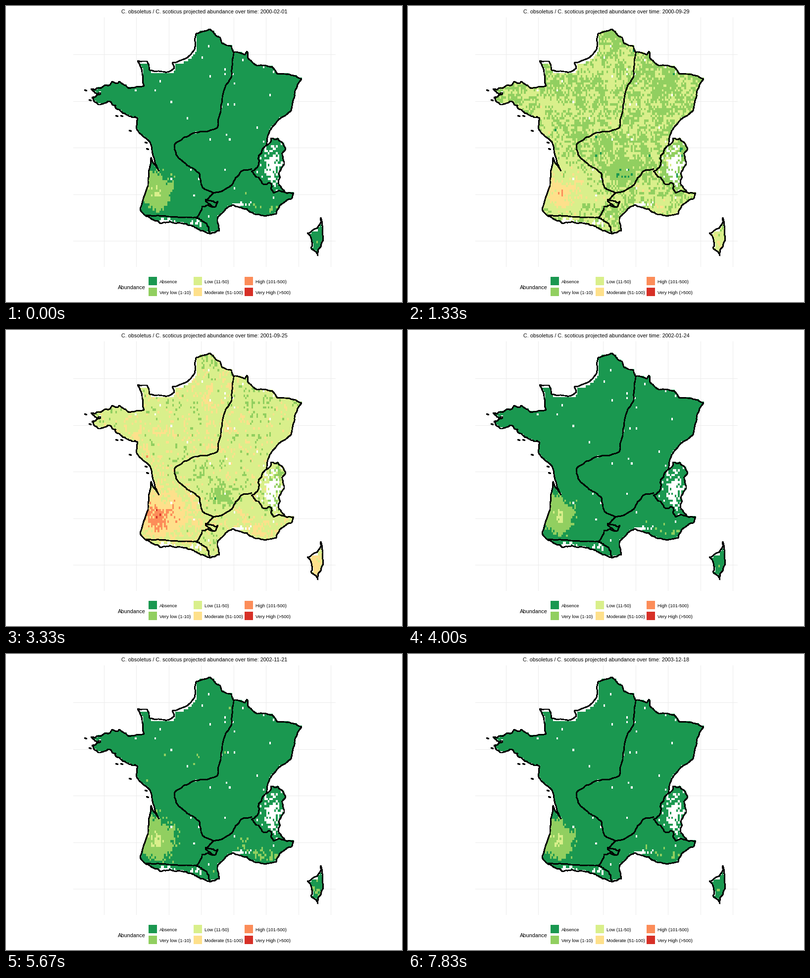
A matplotlib script that plays this animation: 800 by 600 pixels, repeating every 8000 ms.

```python
import numpy as np
import matplotlib.pyplot as plt
from matplotlib.animation import FuncAnimation
from matplotlib.colors import to_rgba_array
from matplotlib.path import Path
from matplotlib.patches import Rectangle

W, H, DPI = 800, 600, 100
LOOP_MS, TICK_MS, STEPS = 8000, 40, 48
COLORS = ["#1A9850", "#91CF60", "#D9EF8B", "#FEE08B", "#FC8D59", "#D73027"]
LABELS = ["Absence", "Very low (1-10)", "Low (11-50)",
          "Moderate (51-100)", "High (101-500)", "Very High (>500)"]

plt.rcParams["font.family"] = "Liberation Sans"
rng = np.random.default_rng(7)


def px(v):
    return v * 72 / DPI


def lon_x(lon):
    return 198.5 + 32.71 * (lon + 4)


def lat_y(lat):
    return 98.5 + 47.25 * (50 - lat)


def ragged(rough, pts):
    """Roughen a line through key points by midpoint displacement."""
    pts = np.array(pts, float)
    while True:
        step = np.diff(pts, axis=0)
        size = np.hypot(*step.T)
        if size.max() < 5:
            return pts
        normal = np.column_stack([-step[:, 1], step[:, 0]])
        shift = rough * np.clip(rng.normal(size=len(step)), -1.3, 1.3)
        mid = pts[:-1] + step / 2 + normal * shift[:, None]
        keep = size >= 5
        pts = np.insert(pts, np.flatnonzero(keep) + 1, mid[keep], axis=0)


# Outer border, anticlockwise from the northern tip
CHANNEL = ragged(.06, [(412, 47), (384, 56), (381, 88), (370, 101), (336, 115),
                       (340, 126), (327, 134), (290, 130), (285, 112), (266, 111),
                       (275, 134), (279, 162), (248, 167), (229, 153)])
BRITTANY = ragged(.2, [(229, 153), (202, 160), (172, 168), (191, 176), (174, 186),
                       (190, 200), (229, 210), (266, 227)])
ATLANTIC = ragged(.04, [(266, 227), (264, 250), (291, 276), (297, 303), (309, 334),
                        (293, 307), (287, 365), (271, 412)])
PYRENEES = ragged(.12, [(271, 412), (283, 426), (312, 441), (353, 440), (394, 456),
                        (431, 456)])
RIVIERA = ragged(.08, [(431, 456), (428, 428), (459, 403), (486, 411), (520, 425),
                       (546, 422), (548, 413), (577, 391), (581, 379)])
ALPS_OUTER = ragged(.15, [(581, 379), (564, 378), (551, 362), (555, 333), (562, 317),
                          (549, 268), (535, 268), (526, 283)])
EAST = ragged(.05, [(526, 283), (529, 263), (556, 226), (576, 212), (584, 172),
                    (597, 148)])
NORTH = ragged(.08, [(597, 148), (549, 138), (537, 123), (507, 121), (488, 104),
                     (487, 92), (482, 99), (460, 94), (456, 82), (436, 75),
                     (433, 64), (412, 47)])
MAINLAND = np.vstack([CHANNEL, BRITTANY, ATLANTIC, PYRENEES, RIVIERA, ALPS_OUTER,
                      EAST, NORTH])
CORSICA = ragged(.12, [(636, 429), (633, 444), (609, 460), (616, 490), (630, 506),
                       (640, 465), (636, 429)])

# Inner zone limits
CENTRE = ragged(.06, [(460, 94), (456, 143), (437, 185), (434, 213), (427, 247),
                      (380, 257), (341, 280), (344, 302), (391, 340), (397, 368),
                      (419, 379), (456, 363), (475, 335), (496, 330)])
ALPS_INNER = ragged(.15, [(526, 283), (511, 320), (496, 335), (514, 353), (536, 361),
                          (541, 379), (564, 378)])
SOUTH = ragged(.1, [(419, 379), (403, 395), (421, 408), (396, 406), (384, 429)])
FOOTHILLS = ragged(.05, [(384, 429), (340, 427), (283, 424)])
LOOP = ragged(.15, [(403, 392), (428, 396), (421, 408)])
CATALAN = ragged(.15, [(384, 429), (404, 440), (412, 460)])
ISLES = [(161, 171), (170, 191), (224, 223), (234, 223), (251, 253), (283, 277),
         (286, 290)]

# Regions: x, y, rx, ry, then winter rise, spring factor, autumn factor
REGIONS = {
    "Landes": (303, 375, 30, 43, 1.6, 0, .55),
    "Gascony": (350, 370, 50, 50, .15, .03, .25),
    "Brittany": (212, 172, 38, 16, .25, -.45, -.08),
    "Normandy": (330, 148, 60, 28, 0, -.17, 0),
    "Flanders": (410, 60, 28, 16, 0, -.4, -.2),
    "Lorraine": (510, 140, 32, 28, 0, -.1, -.15),
    "Vendee": (275, 245, 25, 40, .25, -.22, .1),
    "Berry": (390, 215, 40, 22, .3, 0, .05),
    "Limousin": (385, 288, 35, 25, 0, -.03, -.2),
    "Massif": (430, 338, 30, 28, 0, -.08, -.42),
    "Alps": (543, 325, 16, 52, 0, -.5, -.4),
    "Languedoc": (480, 390, 35, 18, .5, -.17, .15),
    "Roussillon": (422, 438, 14, 18, .5, -.25, .05),
    "Provence": (535, 410, 28, 14, .7, -.05, .2),
    "Corsica": (625, 475, 18, 30, .55, -.05, .35),
}

# Cells of 0.1 degree
LON0, LAT0, COLS, ROWS = -5.2, 51.2, 150, 100
X, Y = np.meshgrid(lon_x(LON0 + .1 * (np.arange(COLS) + .5)),
                   lat_y(LAT0 - .1 * (np.arange(ROWS) + .5)))


def bump(x, y, rx, ry):
    return np.exp(-((X - x) / rx) ** 2 - ((Y - y) / ry) ** 2)


def inside(poly, dx=0, dy=0):
    pts = np.column_stack([(X + dx).ravel(), (Y + dy).ravel()])
    return Path(poly).contains_points(pts).reshape(X.shape)


def land_mask():
    channel = (Y < 136) & (X > 262) & (X < 385)
    land = inside(MAINLAND) & (~channel | inside(MAINLAND, -4, -5))
    land |= inside(CORSICA) & inside(CORSICA, 0, -5)
    alps = inside(np.vstack([ALPS_OUTER, ALPS_INNER]))
    gaps = .006 + alps * (.1 + .9 * bump(539, 322, 12, 28))
    gaps += .9 * bump(320, 436, 17, 5) + .6 * bump(383, 440, 12, 6)
    gaps += .8 * bump(470, 404, 16, 5)
    return land & (rng.random(X.shape) > gaps)


def smooth(a, times=3):
    near = (-1, 0, 1)
    for _ in range(times):
        a = sum(np.roll(a, (i, j), (0, 1)) for i in near for j in near)
    return a / a.std()


LAND = land_mask()
ROUGH = .26 * rng.normal(size=X.shape) + .18 * smooth(rng.normal(size=X.shape))
WINTER, SPRING, AUTUMN = (
    sum(r[4 + k] * bump(*r[:4]) for r in REGIONS.values()) for k in range(3))
PALETTE = to_rgba_array(COLORS)


def sigmoid(v):
    return 1 / (1 + np.exp(-v))


def date(n):
    return np.datetime64("2000-02-01") + int(round(30.12 * n))


def cells(n):
    """Colours of all cells: a yearly wave, shaped by region, plus grain."""
    year = date(n).astype("datetime64[Y]")
    day = (date(n) - year.astype("datetime64[D]")).astype(int)
    age = year.astype(int) - 30
    active = sigmoid((day - 105) / 10) * sigmoid((300 - day) / 10)
    decline = .015 / (1 + .25 * age) * max(day - 140, 0)
    mean = .3 + active * (3.8 + .1 * age - decline)
    late = np.clip((day - 145) / 115, 0, 1)

    level = mean * (1 + active * ((1 - late) * SPRING + late * AUTUMN))
    level += (1 - active) * WINTER
    fresh = np.random.default_rng(100 + n).normal(size=X.shape)
    level += (.4 + active * (.35 + .25 * late)) * (ROUGH + .14 * fresh)
    rgba = PALETTE[np.clip(np.floor(level), 0, 5).astype(int)]
    rgba[~LAND, 3] = 0
    return rgba


def title(n):
    return f"C. obsoletus / C. scoticus projected abundance over time: {date(n)}"


fig = plt.figure(figsize=(W / DPI, H / DPI), dpi=DPI, facecolor="white")
ax = fig.add_axes([0, 0, 1, 1])
ax.axis("off")


def grid_line(x, y):
    ax.plot(x, y, color="#EBEBEB", lw=px(1), snap=False, zorder=0,
            solid_capstyle="butt")


for lon in range(-4, 11, 2):
    grid_line([int(lon_x(lon)) + .5] * 2, [23, 529])
for lat in range(42, 51, 2):
    grid_line([136, 666], [int(lat_y(lat)) + .5] * 2)

img = ax.imshow(cells(0), interpolation="nearest", aspect="auto", zorder=1,
                extent=(lon_x(LON0), lon_x(LON0 + .1 * COLS),
                        lat_y(LAT0 - .1 * ROWS), lat_y(LAT0)))

isles = [ragged(.3, [(x - 2, y - 1), (x + 2, y + 1)]) for x, y in ISLES]
for line in [MAINLAND, CORSICA, CENTRE, ALPS_INNER, SOUTH, FOOTHILLS, LOOP,
             CATALAN] + isles:
    ax.plot(*line.T, color="black", lw=px(1.8), antialiased=False, zorder=3,
            solid_joinstyle="round", solid_capstyle="round")

head = ax.text(400.5, 15, title(0), size=px(10.8), ha="center", va="baseline")
ax.text(226, 574, "Abundance", size=px(11), va="baseline")
for i, (color, label) in enumerate(zip(COLORS, LABELS)):
    kx = (288, 379, 482)[i // 2]
    ky = 549 + 22 * (i % 2)
    ax.add_patch(Rectangle((kx, ky), 17, 17, fc=color, lw=0, antialiased=False))
    ax.text(kx + 22, ky + 13, label, size=px(9.36), va="baseline")

ax.set_xlim(0, W)
ax.set_ylim(H, 0)


def update(tick):
    n = int((tick + 1) * TICK_MS - 1) * STEPS // LOOP_MS
    img.set_data(cells(n))
    head.set_text(title(n))
    return img, head


anim = FuncAnimation(fig, update, frames=LOOP_MS // TICK_MS, interval=TICK_MS,
                     repeat=True, repeat_delay=0, blit=False)
plt.show()
```
